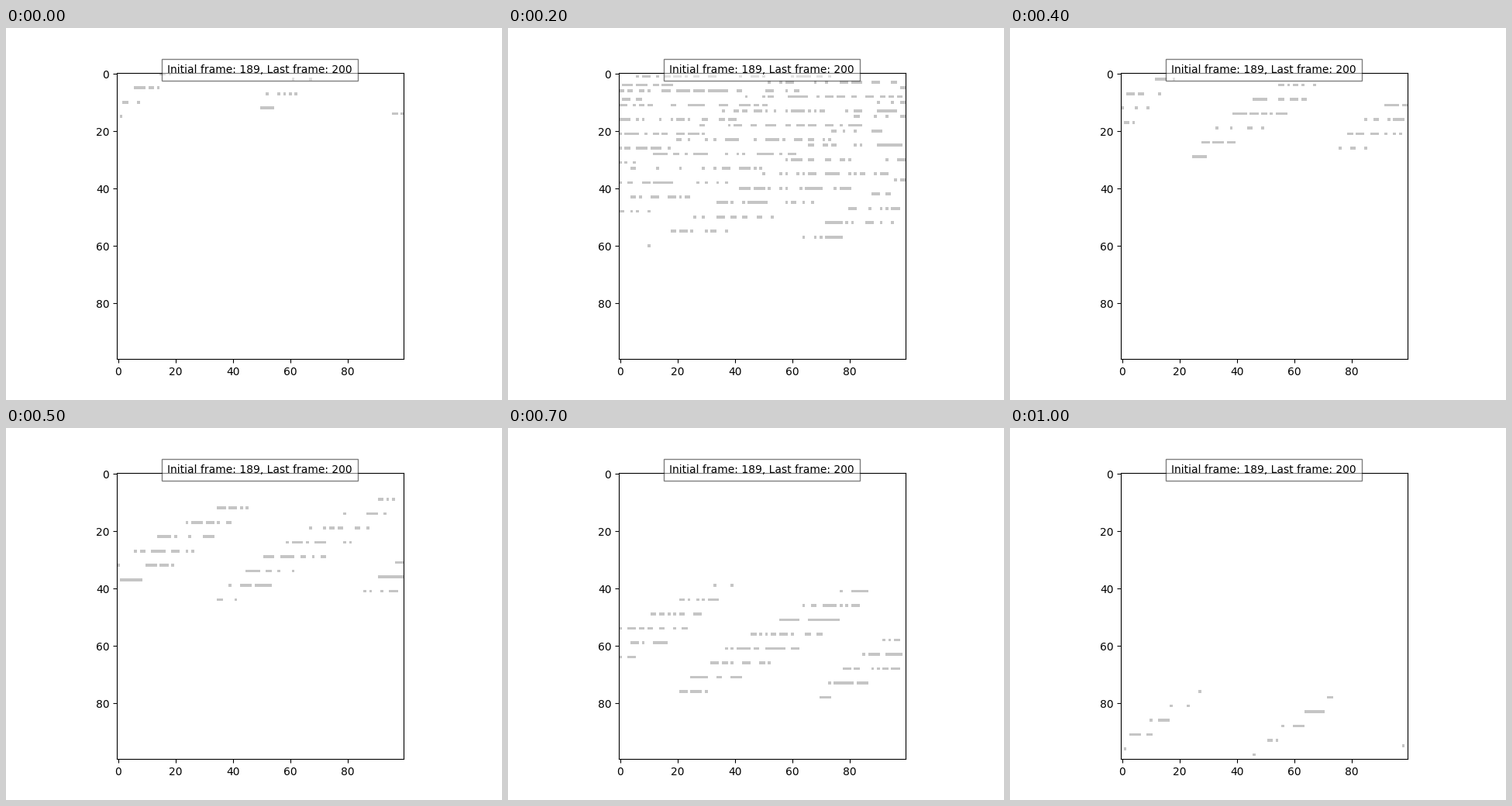
Recreate the animation shown at these times as a matplotlib script. Size 640 by 480 pixels, loop 1.1 s.

```python
import numpy as np
import matplotlib.pyplot as plt
from matplotlib.animation import FuncAnimation

N = 100          # image side in cells
PERIOD = 246     # cells between bursts when the image is read row by row
GREY = 0.77


def dashes(seed, lefts, widths, run=2.6, gap=2.2):
    """Random dashes inside bursts laid along the scan lines."""
    rng = np.random.default_rng(seed)
    line = np.ones(N * N)
    for left, width in zip(np.rint(lefts).astype(int), np.rint(widths)):
        x, right = left, left + max(1, int(width))
        while x < right:
            end = min(x + rng.geometric(1 / run), right)
            line[x:end] = GREY
            x = end + rng.geometric(1 / gap)
        line[right - 1:right] = GREY
    return line.reshape(N, N)


def spot(seed, centre, count, peak, drift=0):
    """A blob whose bursts widen towards its middle."""
    k = np.arange(count)
    rng = np.random.default_rng(seed)
    swell = np.sin(np.pi * (k + 0.5) / count) ** 0.6
    widths = peak * swell + rng.integers(-2, 3, count)
    return dashes(seed, centre + (PERIOD + drift) * k - widths / 2, widths)


def flood(seed):
    """The whole image, with longer bursts in the lower half."""
    k = np.arange(41)
    rng = np.random.default_rng(seed)
    widths = 62 + 40 * np.clip(k / 20 - 1, 0, 1) + rng.integers(-6, 7, k.size)
    lefts = 33 + PERIOD * k + rng.integers(-5, 6, k.size)
    return dashes(seed, lefts, widths, run=2.8, gap=2.6)


def ebb(seed):
    """Bursts that shrink to nothing on the way down."""
    k = np.arange(25)
    widths = 68 * np.sqrt(1 - k / 24)
    return dashes(seed, 106 + PERIOD * k, widths, run=2.4, gap=2.8)


images = [
    spot(1, 17, 7, 9, drift=1),
    flood(2),
    ebb(3),
    spot(4, 225, 19, 28),
    spot(5, 215, 12, 19, drift=0.6),
    spot(6, 994, 15, 22),
    spot(7, 1980, 19, 25),
    spot(8, 3936, 17, 24),
    spot(9, 6393, 14, 24, drift=-1.2),
    spot(10, 6888, 12, 15),
    spot(11, 7627, 10, 7, drift=0.6),
]

fig, ax = plt.subplots(figsize=(6.4, 4.8), dpi=100)
fig.subplots_adjust(left=0.1248, right=0.8998)
picture = ax.imshow(images[0], cmap="gray", vmin=0, vmax=1,
                    interpolation="nearest")
ax.text(0.499, 1.01, "Initial frame: 189, Last frame: 200",
        ha="center", va="center", transform=ax.transAxes,
        bbox={"facecolor": "w", "alpha": 0.5, "pad": 5})


def update(i):
    picture.set_data(images[i])
    return [picture]


anim = FuncAnimation(fig, update, frames=len(images), interval=100,
                     repeat=True, repeat_delay=0)
plt.show()
```
